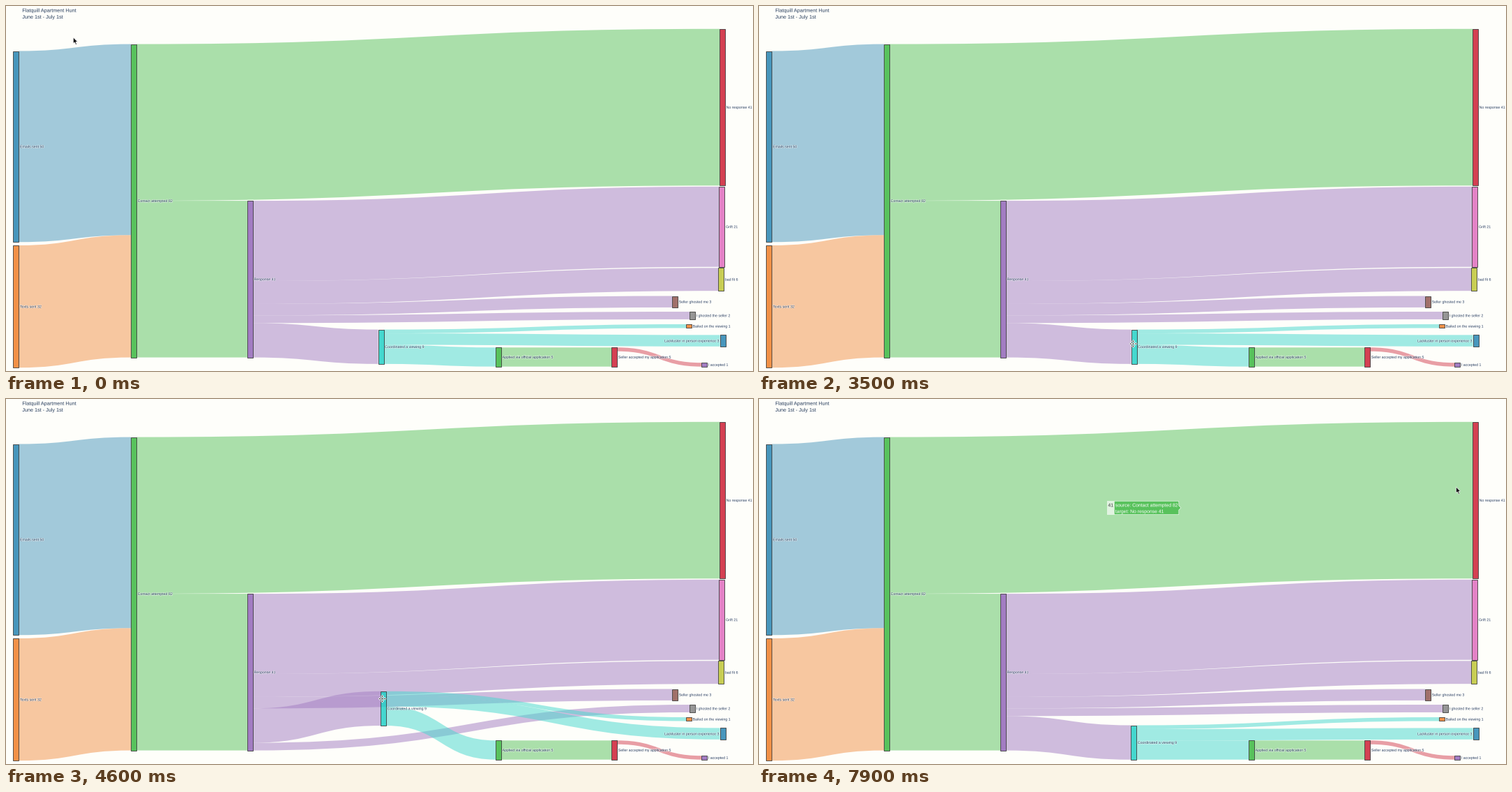
Write a matplotlib script that moves like this. It is 1071 px wide and 523 px high and loops after 8 s.

```python
import matplotlib.pyplot as plt
import numpy as np
from matplotlib.animation import FuncAnimation
from matplotlib.patches import PathPatch, Polygon, Rectangle
from matplotlib.path import Path
from matplotlib.textpath import TextPath

W, H, DPI = 1071, 523, 64
PX = 72 / DPI
UNIT = 5.475          # pixels per flow unit
NODE_W = 8
TIP_FONT, PAD, ARROW, LINE = 6.84, 1.58, 3.16, 8.9
BG = np.array([254, 254, 250]) / 255
INK = "#2a3f5f"


def rgb(*c):
    return np.array(c) / 255


BLUE, ORANGE, GREEN = rgb(72, 150, 188), rgb(242, 145, 72), rgb(88, 194, 92)
PURPLE, RED, PINK = rgb(162, 124, 194), rgb(212, 64, 82), rgb(228, 130, 200)
OLIVE, BROWN, GRAY = rgb(200, 206, 84), rgb(160, 112, 106), rgb(150, 150, 150)
TEAL = rgb(68, 216, 206)

# key: label, value, left, top, colour
NODES = {
    "emails": ("Emails sent 50", 50, 10.3, 64.5, BLUE),
    "texts": ("Texts sent 32", 32, 10.3, 343, ORANGE),
    "contact": ("Contact attempted 82", 82, 179, 54.6, GREEN),
    "response": ("Response 41", 41, 346, 279.1, PURPLE),
    "none": ("No response 41", 41, 1023, 32.8, RED),
    "grift": ("Grift 21", 21, 1022.4, 258.8, PINK),
    "badfit": ("bad fit 6", 6, 1021.2, 375.3, OLIVE),
    "ghosted": ("Seller ghosted me 3", 3, 955, 415.5, BROWN),
    "ighosted": ("I ghosted the seller 2", 2, 980, 438, GRAY),
    "bailed": ("Bailed on the viewing 1", 1, 975, 456, ORANGE),
    "lack": ("Lackluster in person experience 3", 3, 1023.6, 471.4, BLUE),
    "viewing": ("Coordinated a viewing 9", 9, 533.6, 463.6, TEAL),
    "applied": ("Applied via official application 5", 5, 702, 489.3, GREEN),
    "accepted": ("Seller accepted my application 5", 5, 868.2, 489.3, RED),
    "done": ("I accepted 1", 1, 997.2, 511.2, PURPLE),
}

LINKS = [
    ("emails", "contact", 50), ("texts", "contact", 32),
    ("contact", "none", 41), ("contact", "response", 41),
    ("response", "grift", 21), ("response", "badfit", 6),
    ("response", "ghosted", 3), ("response", "ighosted", 2),
    ("response", "viewing", 9), ("viewing", "bailed", 1),
    ("viewing", "lack", 3), ("viewing", "applied", 5),
    ("applied", "accepted", 5), ("accepted", "done", 1),
]

# pointer keys: step, x, y
POINTER = np.array([
    (0, 96.5, 45), (1, 115, 75), (3, 172, 140), (5, 222, 180), (6, 222, 180),
    (9, 400, 240), (10, 440, 290), (12, 450, 364), (13, 450, 364),
    (15, 328, 309.5), (16, 268, 290), (17, 225, 255), (18, 160, 245),
    (19, 150, 270), (20, 195, 262), (22, 300, 281), (26, 480, 420),
    (28, 590, 465), (29, 590, 465), (30, 562, 493), (31, 536.5, 484),
    (35, 536.5, 484), (37, 534, 436), (39, 532.5, 385.5), (41, 534, 349.5),
    (43, 537, 387), (46, 539.5, 429.5), (49, 538, 471), (51, 537, 492.5),
    (52, 537, 492.5), (53, 535.7, 495.5), (55, 535.7, 495.5), (56, 536.5, 494),
    (57, 536.5, 494), (58, 569, 477), (59, 569, 477), (64, 637, 480),
    (66, 637, 480), (69, 660, 440), (72, 720, 300), (75, 809, 152),
    (77, 964, 113.5), (78, 964, 113.5), (79, 999.5, 126),
])

# dragged node keys: step, left, top
DRAG = np.array([
    (35, 533.6, 463.6), (37, 532, 428), (39, 531.2, 378), (41, 532, 342),
    (43, 534.5, 378), (46, 537, 418.8), (49, 535, 457), (51, 533.2, 467.5),
])

fig = plt.figure(figsize=(W / DPI, H / DPI), dpi=DPI, facecolor=BG)
ax = fig.add_axes([0, 0, 1, 1])
ax.set_xlim(0, W)
ax.set_ylim(H, 0)
ax.axis("off")

glyphs = {}


def along(keys, step):
    return [np.interp(step, keys[:, 0], keys[:, i]) for i in (1, 2)]


def put(patch):
    # add_artist skips the costly data limit search of add_patch
    return ax.add_artist(patch)


def outline(s, size):
    if (s, size) not in glyphs:
        glyphs[s, size] = TextPath((0, 0), s, size=size,
                                   prop={"family": "Liberation Sans"})
    return glyphs[s, size]


def width(s, size):
    return outline(s, size).vertices[:, 0].max()


def text(x, y, s, size, color, halo=False):
    """Text starting at x whose digits are centred on y."""
    p = outline(s, size)
    p = Path(p.vertices * [1, -1] + [x, y + 0.36 * size], p.codes)
    if halo:
        put(PathPatch(p, fc="none", ec=(1, 1, 1, 0.5), lw=1.3 * PX,
                      joinstyle="round"))
    put(PathPatch(p, fc=color, lw=0))


def ribbon(xa, ya, xb, yb, h):
    m = (xa + xb) / 2
    pts = [(xa, ya), (m, ya), (m, yb), (xb, yb),
           (xb, yb + h), (m, yb + h), (m, ya + h), (xa, ya + h), (xa, ya)]
    c = Path.CURVE4
    return Path(pts, [Path.MOVETO, c, c, c, Path.LINETO, c, c, c,
                      Path.CLOSEPOLY])


def layout(pos):
    """Stack the links on both sides of every node by the far end's height."""
    start, end = {}, {}
    for key in NODES:
        for near, far, store in ((0, 1, start), (1, 0, end)):
            y = pos[key][1]
            mine = [k for k in LINKS if k[near] == key]
            for link in sorted(mine, key=lambda k: pos[k[far]][1]):
                store[link] = y
                y += link[2] * UNIT
    out = []
    for link in LINKS:
        src, dst, value = link
        xa, xb, h = pos[src][0] + NODE_W, pos[dst][0], value * UNIT
        mid = (xa + xb) / 2, (start[link] + end[link] + h) / 2
        out.append((link, ribbon(xa, start[link], xb, end[link], h), mid))
    return out


def tooltip(x, y, lines, value, color, left):
    ink = "#444444" if color is TEAL else "white"
    w = max(width(s, TIP_FONT) for s in lines) + 2 * PAD
    nw = width(value, TIP_FONT) + 2 * PAD
    h = LINE * len(lines) + 1.6
    d = -1 if left else 1
    near, far = x + d * ARROW, x + d * (ARROW + w)
    box_x, name_x = min(near, far), (far - nw if left else far)
    put(Rectangle((name_x, y - h / 2), nw, h, fc=(1, 1, 1, 0.65), lw=0))
    put(Polygon([(x, y), (near, y + ARROW), (near, y + h / 2),
                 (far, y + h / 2), (far, y - h / 2), (near, y - h / 2),
                 (near, y - ARROW)], fc=color, ec=ink, lw=0.55 * PX))
    top = y + 0.4 - LINE * (len(lines) - 1) / 2
    for i, s in enumerate(lines):
        text(box_x + PAD, top + i * LINE, s, TIP_FONT, ink)
    text(name_x + PAD, top, value, TIP_FONT, "#333333")


def arrow_pointer(x, y):
    shape = np.array([(0, 0), (0, 8.7), (2, 6.9), (3.5, 10.3), (4.9, 9.7),
                      (3.5, 6.4), (6.1, 6.2)])
    put(Polygon(shape + [x, y], fc="#111111", ec="white", lw=0.6 * PX))


def move_pointer(x, y):
    arm = np.array([(-0.6, -0.6), (-0.6, -3.1), (-2, -3.1), (0, -5.4),
                    (2, -3.1), (0.6, -3.1)])
    pts = []
    for _ in range(4):
        pts.extend(arm)
        arm = np.column_stack([-arm[:, 1], arm[:, 0]])
    put(Polygon(np.array(pts) + [x, y], fc="#111111", ec="white",
                lw=0.8 * PX))


def draw_node(key, x, y):
    label, value, _, _, color = NODES[key]
    h = value * UNIT
    fill = np.clip((color - 0.2 * BG) / 0.8, 0, 1)
    put(Rectangle((x, y), NODE_W, h, fc=(*fill, 0.8), ec="#3c3c3c",
                  lw=0.85 * PX))
    size = 5.25
    tx = x - 1.4 - width(label, size) if key == "lack" else x + NODE_W + 1.6
    text(tx, y + h / 2, label, size, INK, halo=True)


def hover(x, y, pos, links):
    for key, (nx, ny) in pos.items():
        label, value, _, _, color = NODES[key]
        h = value * UNIT
        if nx <= x <= nx + NODE_W and ny <= y <= ny + h:
            ins = sum(k[1] == key for k in LINKS)
            outs = sum(k[0] == key for k in LINKS)
            lines = [label, f"incoming flow count: {ins}",
                     f"outgoing flow count: {outs}"]
            tooltip(nx - 1, ny + h / 4, lines, str(value), color, True)
            return
    for (src, dst, value), path, mid in reversed(links):
        if path.contains_point((x, y)):
            lines = [f"source: {NODES[src][0]}", f"target: {NODES[dst][0]}"]
            tooltip(*mid, lines, str(value), NODES[src][4], x >= mid[0])
            return


home = {k: (n[2], n[3]) for k, n in NODES.items()}
bands = [put(PathPatch(path, fc=(*NODES[link[0]][4], 0.5), lw=0))
         for link, path, _ in layout(home)]
for name, spot in home.items():
    if name != "viewing":
        draw_node(name, *spot)
text(23.3, 6.1, "Flatquill Apartment Hunt", 7.25, INK)
text(23.3, 15.4, "June 1st - July 1st", 7.25, INK)
FIXED = len(ax.patches)


def update(step):
    for patch in list(ax.patches)[FIXED:]:
        patch.remove()
    nx, ny = along(DRAG, step)
    pos = {**home, "viewing": (nx, ny)}
    links = layout(pos)
    for band, (_, path, _) in zip(bands, links):
        band.set_path(path)
    draw_node("viewing", nx, ny)

    x, y = along(POINTER, step)
    if not 35 <= step < 56:
        hover(x, y, pos, links)
    if 31 <= step < 58:
        move_pointer(x, y)
    else:
        arrow_pointer(x, y)
    return bands


anim = FuncAnimation(fig, update, frames=80, interval=100, repeat=True,
                     repeat_delay=0, blit=False)
plt.show()
```
